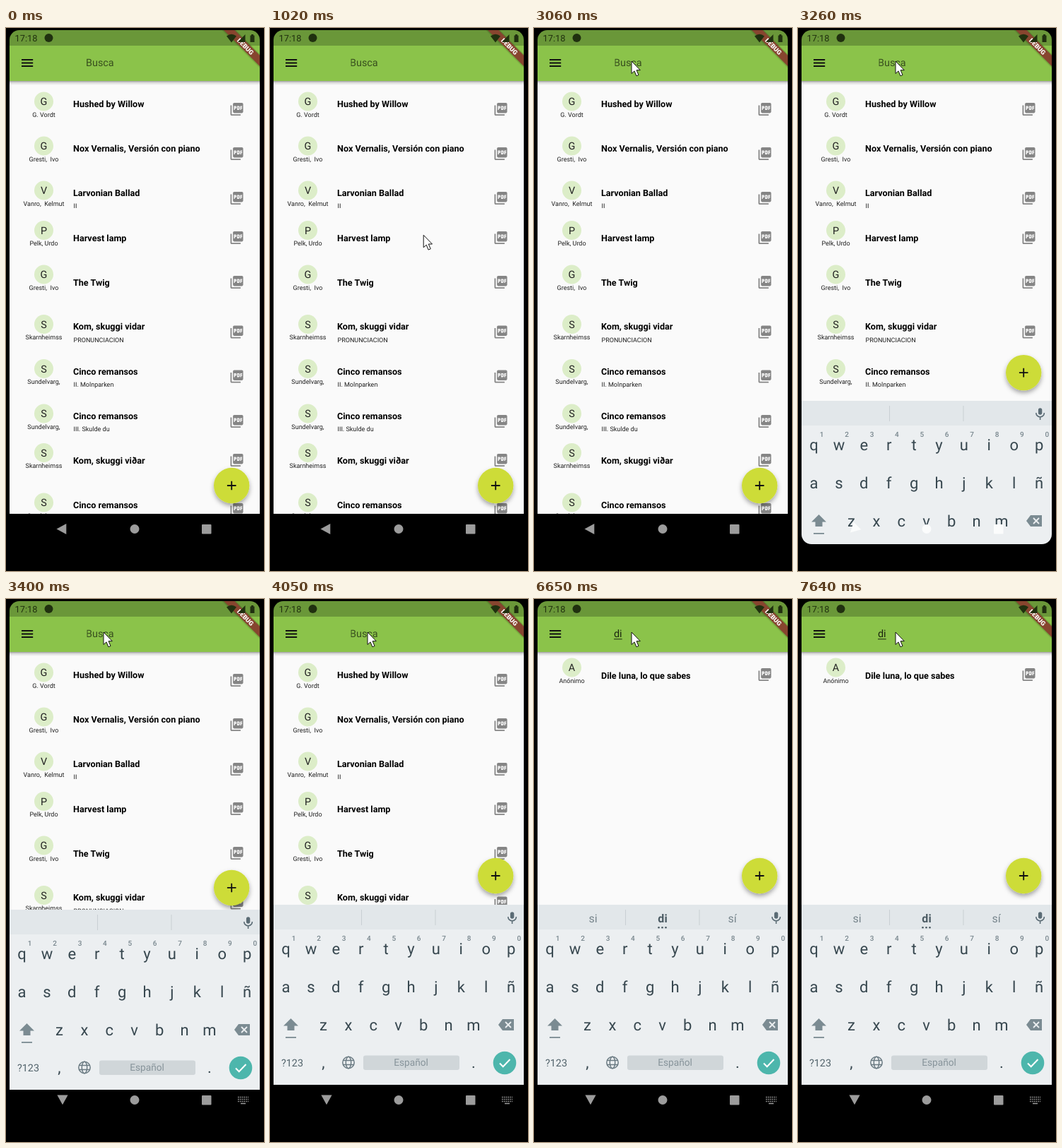
Write an HTML page that moves like this. It is 365 px wide and 769 px high and loops after 8 s.

```html
<!DOCTYPE html>
<html lang="es">
<head>
<meta charset="utf-8">
<title>Busca</title>
<style>
  html, body { margin: 0; width: 100%; height: 100%; overflow: hidden; background: #000; }
  svg { display: block; font-family: Roboto, sans-serif; text-rendering: geometricPrecision; }
  .mid { text-anchor: middle; }
  .title { font-size: 12.6px; font-weight: 700; fill: #000; }
  .small { font-size: 9px; fill: #1f1f1f; }
  .initial { font-size: 14.4px; fill: #212121; }
  .input { font-size: 14.4px; }
  .key { font-size: 22px; fill: #37474f; }
  .digit { font-size: 10px; font-weight: 500; fill: #78868d; }
  .hintword { font-size: 16px; fill: #78868d; }
  .hintword.best { font-weight: 700; fill: #4a5a62; }
</style>
</head>
<body>
<svg width="365" height="769" viewBox="0 0 365 769">
  <defs>
    <clipPath id="screen"><rect x="5" y="3" width="354" height="728" rx="14"/></clipPath>
    <clipPath id="bodyArea"><rect x="5" y="75" width="354" height="613"/></clipPath>
    <linearGradient id="barShade" x2="0" y2="1">
      <stop stop-color="#000" stop-opacity=".36"/>
      <stop offset=".4" stop-color="#000" stop-opacity=".13"/>
      <stop offset="1" stop-color="#000" stop-opacity="0"/>
    </linearGradient>
    <filter id="lift" x="-30%" y="-30%" width="160%" height="170%">
      <feDropShadow dx="0" dy="3.5" stdDeviation="3" flood-opacity=".35"/>
    </filter>
    <filter id="soft"><feGaussianBlur stdDeviation="2"/></filter>
    <path id="pdf" fill="#858585" transform="scale(.9) translate(-12 -12)" d="M20 2H8c-1.1 0-2 .9-2 2v12c0 1.1.9 2 2 2h12c1.1 0 2-.9 2-2V4c0-1.1-.9-2-2-2zm-8.5 7.5c0 .83-.67 1.5-1.5 1.5H9v2H7.5V7H10c.83 0 1.5.67 1.5 1.5v1zm5 2c0 .83-.67 1.5-1.5 1.5h-2.5V7H15c.83 0 1.5.67 1.5 1.5v3zm4-3H19v1h1.5V11H19v2h-1.5V7h3v1.5zM9 9.5h1v-1H9v1zM4 6H2v14c0 1.1.9 2 2 2h14v-2H4V6zm10 5.5h1v-3h-1v3z"/>
  </defs>

  <g clip-path="url(#screen)">
    <g clip-path="url(#bodyArea)">
      <rect x="5" y="75" width="354" height="613" fill="#fafafa"/>
      <g id="list"></g>
      <g id="result"></g>
      <rect x="5" y="75" width="354" height="6" fill="url(#barShade)"/>
      <g id="fab">
        <circle r="25.2" fill="#cddc39" filter="url(#lift)"/>
        <path d="M-6.3 0H6.3M0-6.3V6.3" stroke="#111" stroke-width="1.8"/>
      </g>
    </g>

    <rect x="5" y="25" width="354" height="50" fill="#8bc34a"/>
    <rect x="5" y="3" width="354" height="22" fill="#6a9739"/>
    <path d="M22 45h16.2M22 49.5h16.2M22 54h16.2" stroke="#111" stroke-width="1.8"/>
    <text id="hint" class="input" x="113" y="54">Busca</text>
    <text id="typed" class="input" x="113" y="54" fill="#1b250f"></text>
    <rect id="underline" x="113" y="56.3" height="1" fill="#1b250f"/>
    <rect id="caret" y="41" width="1.5" height="17" fill="#8bc34a"/>

    <g transform="translate(359 3) rotate(45)">
      <rect x="-40" y="25.2" width="80" height="10.8" opacity=".4" filter="url(#soft)"/>
      <rect x="-40" y="25.2" width="80" height="10.8" fill="#87452f"/>
      <text class="mid" x="2" y="33.9" font-size="9" font-weight="900" fill="#fff">DEBUG</text>
    </g>
    <g fill="#20300f">
      <text x="12.5" y="18.7" font-size="12.8">17:18</text>
      <circle cx="60.5" cy="14" r="6"/>
      <path d="M319 20.5L312 11.5Q319 6 326 11.5ZM338.5 9V20H328Z"/>
      <path d="M345.5 10.5h1.5v-1.5h3v1.5h1.5V20h-6Z"/>
    </g>

    <rect x="5" y="688" width="354" height="43"/>
    <g id="keyboard">
      <rect x="5" y="433" width="354" height="255" fill="#eceff1"/>
      <rect x="5" y="433" width="354" height="35" fill="#e2e7ea"/>
      <path d="M129.5 440V462M234 440V462" stroke="#c9cfd3"/>
      <g id="words"></g>
      <g stroke="#5b6c75" fill="none" stroke-width="1.6">
        <rect x="340.7" y="444" width="3.8" height="8" rx="1.9" fill="#5b6c75"/>
        <path d="M336.8 450a5.8 5.8 0 0 0 11.6 0M342.6 456v4"/>
      </g>
      <g id="keys"></g>
      <g fill="#7b8b92">
        <path d="M29.5 594L40 604.5H34.5V611H24.5V604.5H19Z"/>
        <rect x="22" y="620" width="15" height="1.8"/>
        <path d="M323 603L329 595H345V611H329Z"/>
      </g>
      <path d="M333 599l8 8m0-8l-8 8" stroke="#eceff1" stroke-width="1.8"/>
      <text class="mid" x="31.5" y="662" font-size="14.4" fill="#52636b">?123</text>
      <g fill="none" stroke="#6b7b83" stroke-width="1.5">
        <circle cx="111" cy="656.5" r="8.2"/>
        <ellipse cx="111" cy="656.5" rx="3.7" ry="8.2"/>
        <path d="M103.5 653.5h15M103.5 659.5h15"/>
      </g>
      <rect x="132" y="646.5" width="136" height="20.5" rx="3" fill="#d0d6d9"/>
      <text class="mid" x="199.5" y="661.3" font-size="13.7" fill="#86939a">Español</text>
      <circle cx="332" cy="657" r="16.3" fill="#4db6ac"/>
      <path d="M325 657.5l4.7 4.7L339.5 652" fill="none" stroke="#fff" stroke-width="2"/>
    </g>

    <g id="nav" fill="#9c9c9c">
      <path id="back" d="M-7.8 0L6-7.6V7.6Z"/>
      <circle cx="182" cy="709.5" r="6.5"/>
      <rect x="277" y="703" width="13.5" height="13.5" rx="1"/>
      <g id="switcher" stroke="#9c9c9c" stroke-width="1.5" stroke-dasharray="1.6 1.2">
        <path d="M328 705.5h15M328 708.5h15M328 711.5h15"/>
        <path d="M332 714.5h7" stroke-dasharray="none"/>
      </g>
    </g>
  </g>

  <circle id="click" cx="138" cy="47" r="12" fill="#ff0" opacity=".47"/>
  <path id="mouse" d="M0 0V17.5L4 13.9L6.9 20.8L10 19.5L7.1 12.7H12.3Z" fill="#fff" stroke="#111"/>
</svg>

<script>
const $ = id => document.getElementById(id);
const text = (cls, x, y, s) => `<text class="${cls}" x="${x}" y="${y}">${s}</text>`;

// avatar y, title y, icon y, author, title, subtitle, subtitle y
function row(ay, ty, iy, author, title, sub, sy) {
  return `<circle cx="53.5" cy="${ay}" r="13.5" fill="#dcedc8"/>` +
    text('initial mid', 53.5, ay + 5.1, author[0]) +
    text('small mid', 53.5, ay + 21.6, author) +
    text('title', 95, ty + 4.5, title) +
    (sub ? text('small', 95.5, sy + 3.2, sub) : '') +
    `<use href="#pdf" x="326.5" y="${iy}"/>`;
}

$('list').innerHTML = [
  [104, 107, 115, 'G. Vordt', 'Hushed by Willow'],
  [167, 170, 178, 'Gresti,\u00a0 Ivo', 'Nox Vernalis, Versión con piano'],
  [230, 233, 241, 'Vanro,\u00a0 Kelmut', 'Larvonian Ballad', 'II', 252],
  [286.5, 297, 297, 'Pelk, Urdo', 'Harvest lamp'],
  [349, 360, 360, 'Gresti,\u00a0 Ivo', 'The Twig'],
  [419.5, 422.5, 430.5, 'Skarnheimss', 'Kom, skuggi vidar', 'PRONUNCIACION', 441.5],
  [482.5, 486, 493.5, 'Sundelvarg,', 'Cinco remansos', 'II. Molnparken', 505],
  [546, 549, 557, 'Sundelvarg,', 'Cinco remansos', 'III. Skulde du', 568],
  [601.5, 612.5, 612, 'Skarnheimss', 'Kom, skuggi viðar'],
  [672, 675, 682, 'Sundelvarg,', 'Cinco remansos']
].map(r => row(...r)).join('');
$('result').innerHTML = row(97, 108, 107, 'Anónimo', 'Dile luna, lo que sabes');

const keyRow = (chars, x, y) =>
  [...chars].map((c, i) => text('key mid', x + 35.4 * i, y, c)).join('');
$('keys').innerHTML = keyRow('qwertyuiop', 22.5, 503) + keyRow('asdfghjklñ', 22.5, 556.5) +
  keyRow('zxcvbnm', 75.5, 611) + text('key mid', 75.5, 664, ',') + text('key mid', 288, 664, '.') +
  [...'1234567890'].map((c, i) => text('digit mid', 33.7 + 35.4 * i, 483.5, c)).join('');

const words = (a, b, c) =>
  text('hintword mid', 83.5, 457.5, a) + text('hintword best mid', 182, 457.5, b) +
  text('hintword mid', 280.5, 457.5, c) +
  [176.5, 181.5, 186.5].map(x => `<circle cx="${x}" cy="465.3" r="1.3" fill="#4a5a62"/>`).join('');

const clamp = v => Math.min(1, Math.max(0, v));
const show = (id, on) => { $(id).style.display = on ? '' : 'none'; };
const move = (id, x, y, more = '') => $(id).setAttribute('transform', `translate(${x} ${y})${more}`);
const hold = (t, from) => from + 70 * Math.floor((t - from) / 70);

const blinks = [530, 1060, 1580, 2070, 2600, 3590, 4050, 4580, 4840, 5440, 6060, 6650, 7180, 7640];
let lastWords = '';

function draw(t) {
  // pointer: long sweep up from the corner, then a short settle
  const mt = hold(t, 670);
  const a = clamp((mt - 670) / 770), b = clamp((mt - 1440) / 280);
  const sweep = 1 - (1 - a) ** 1.8, settle = 1 - (1 - b) ** 2;
  show('mouse', t >= 670);
  move('mouse', 354 - 206 * sweep - 10 * settle, 725 - 650 * sweep - 28 * settle);
  show('click', t >= 2860 && t < 3060);

  // keyboard and the resized body
  const kt = hold(t, 3260) - 3112;
  const drop = Math.round(298 * (1 - clamp(kt / 340)) ** 2);
  const up = kt > 0, over = up && drop > 40;
  show('keyboard', up);
  move('keyboard', 0, drop);
  move('fab', 319.2, 392 + 256 * (1 - clamp(kt / 397)) ** 2.1);
  const turn = clamp((kt - 60) / 180);
  move('back', 79.3 + turn * .7, 709.5 - turn, ` rotate(${-90 * turn})`);
  $('nav').setAttribute('fill', over ? '#fbfcfc' : '#9c9c9c');
  show('switcher', up && !over);

  // typing
  const s = t < 4840 ? '' : t < 6060 ? 'd' : 'di';
  const w = [0, 8.1, 11.7][s.length];
  show('list', !s);
  show('result', s);
  $('typed').textContent = s;
  $('underline').setAttribute('width', w);
  const fade = clamp(1 - (hold(t, 4840) - 4780) / 220);
  $('hint').setAttribute('fill-opacity', .6 * fade);
  $('caret').setAttribute('x', 113 + w);
  show('caret', blinks.filter(m => m <= t).length % 2);

  const next = t < 5050 ? '' : t < 6190 ? 'de d del' : 'si di sí';
  if (next !== lastWords) {
    $('words').innerHTML = next ? words(...next.split(' ')) : '';
    lastWords = next;
  }
}

function tick() {
  draw(performance.now() % 8000);
  requestAnimationFrame(tick);
}
tick();
</script>
</body>
</html>
```
